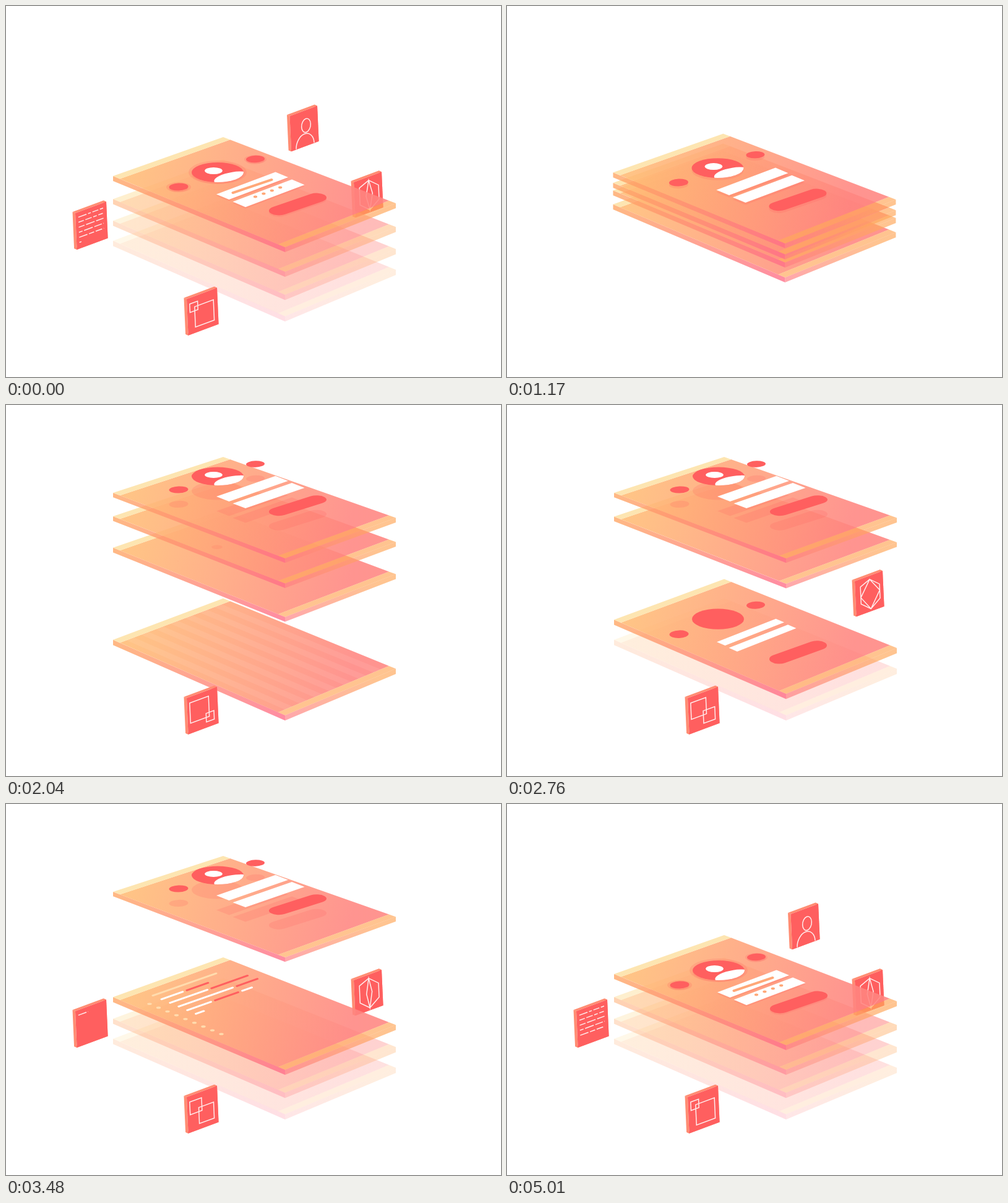
Write an HTML page with a canvas that moves like this. It is 800 px wide and 600 px high and loops after 5.04 s.

```html
<!DOCTYPE html>
<html lang="en">
<head>
<meta charset="utf-8">
<title>Layers</title>
<style>
  html, body { margin: 0; width: 100%; height: 100%; overflow: hidden; background: #fff; }
  canvas { display: block; width: 800px; height: 600px; }
</style>
</head>
<body>
<canvas id="stage" width="800" height="600"></canvas>
<script>
const ctx = document.getElementById('stage').getContext('2d');
const LOOP = 5040, REST = 630, OPEN = 1050, CLOSE = 5070, SPAN = 450;
const DROP = [OPEN, 1910, 2720, 3763];   // when each slab goes down, lowest first
const RED = '#ff5f5f', WHITE = '#fff', PALE = '#ffdcae', PEACH = '#ffa878';

const mix = (a, b, p) => a + (b - a) * p;
const part = (t, start, span) => Math.max(0, Math.min(1, (t - start) / span));

// Eased progress from 0 to 1.
function move(t, start, span = SPAN) {
  const q = part(t, start, span);
  return q < .5 ? 4 * q ** 3 : 1 - 4 * (1 - q) ** 3;
}

// Draws with a fading factor and restores the state.
function group(alpha, draw) {
  if (alpha <= 0) return;
  ctx.save();
  ctx.globalAlpha *= alpha;
  draw();
  ctx.restore();
}

function poly(points, fill, alpha = 1) {
  group(alpha, () => {
    ctx.fillStyle = fill;
    ctx.beginPath();
    points.forEach(p => ctx.lineTo(...p));
    ctx.fill();
  });
}

const para = (x, y, ax, ay, dx, dy) =>
  [[x, y], [x + ax, y + ay], [x + ax + dx, y + ay + dy], [x + dx, y + dy]];

function oval(x, y, rx, ry, fill, tilt = 0) {
  ctx.fillStyle = fill;
  ctx.beginPath();
  ctx.ellipse(x, y, rx, ry, tilt, 0, 7);
  ctx.fill();
}

// Round-ended bar foreshortened in y.
function capsule(x1, y1, x2, y2, rx, ry, color) {
  const k = ry / rx;
  ctx.save();
  ctx.scale(1, k);
  ctx.lineCap = 'round';
  ctx.lineWidth = 2 * rx;
  ctx.strokeStyle = color;
  ctx.beginPath();
  ctx.moveTo(x1, y1 / k);
  ctx.lineTo(x2, y2 / k);
  ctx.stroke();
  ctx.restore();
}

function grown(x, y, g, draw) {
  if (g <= 0) return;
  ctx.save();
  ctx.translate(x, y);
  ctx.scale(g, g);
  ctx.translate(-x, -y);
  draw();
  ctx.restore();
}

function ramp(x1, y1, x2, y2, c1, c2) {
  const g = ctx.createLinearGradient(x1, y1, x2, y2);
  g.addColorStop(0, c1);
  g.addColorStop(1, c2);
  return g;
}
const FACE = ramp(205, 265, 545, 365, '#ffbb75', '#ff8580');
const FRONT = ramp(173, 279, 451, 394, '#ffa562', '#ff6c88');
const SIDE = ramp(451, 394, 600, 335, '#ff7d84', '#ffa85c');

// Slab plane at height 275: u along the front edge, v along the left edge.
const P = (u, v) => [173 + 278 * u + 178 * v + u * v, 275 + 115 * u - 63 * v - 8 * u * v];
const strip = (u1, u2, v1 = 0, v2 = 1) => [P(u1, v1), P(u1, v2), P(u2, v2), P(u2, v1)];
const wall = (p, q) => [p, q, [q[0], q[1] + 8], [p[0], p[1] + 8]];

// Moves art from height `base` to `level`; lower planes look more open.
function atLevel(level, base, dx, draw) {
  const d = level - base, k = .000592;
  ctx.save();
  ctx.transform(1, 0, 0, 1 + k * d, dx, d * (1 - k * base));
  draw();
  ctx.restore();
}

function slab() {
  poly(wall(P(0, 0), P(1, 0)), FRONT, .78);
  poly(wall(P(1, 0), P(1, 1)), SIDE, .68);
  poly(strip(.04, .96), FACE, .88);
  poly(strip(0, .04), '#fde3ab', .92);
  poly(strip(.96, 1), '#ffa85c', .68);
}

function stripes(t) {
  const end = mix(.04, .96, move(t, 1540));
  for (let v = .06; v < .9; v += .133) poly(strip(.04, end, v, v + .067), WHITE, .08);
}

// The card's basic shapes; `g` gives the size of each step, `w` the bar width.
function shapes(body, bar, w, g = () => 1) {
  grown(342, 268.5, g(0), () => oval(342, 268.5, 42, 16, body));
  grown(279, 292, g(1), () => oval(279, 292, 15.5, 6, body, -.04));
  grown(403, 247, g(1), () => oval(403, 247, 15, 5.7, body, -.04));
  for (const k of [0, 1]) {
    const x = 340 + k * (w + 6), y = 304 + k * (.42 * w + 3.5);
    grown(x + 50, y - 15, g(2 + k), () => poly(para(x, y, 95.5, -36, w, .42 * w), bar));
  }
  grown(471, 320, g(4), () => capsule(441, 330.5, 502, 309.5, 16, 7.4, body));
}

function wireframe(t) {
  ctx.translate(-1, 5.5);
  shapes(RED, WHITE, 13.5, i => move(t, DROP[1] + 60 * i, 350));
}

// Word lengths in each typed line.
const WORDS = [[102], [34, 34], [60, 58], [87, 33], [38, 37, 15], [40, 37]];

function code(t) {
  WORDS.forEach((words, r) => {
    const typed = (t - 3047 - 85 * r) * 1.4;
    let from = 0;
    words.forEach((length, i) => {
      const end = Math.min(from + length, typed);
      const x = 237.5 + 13.9 * r, y = 310.5 + 5.9 * r;
      const color = r ? [WHITE, RED][i % 2] : PALE;
      if (end > from) capsule(x + from, y - from * .352, x + end, y - end * .352, 2, 1.4, color);
      from += length + 7;
    });
  });
  for (let i = 0; i < 15 && t >= 3040 + 55 * i; i++)
    oval(232 + 14.5 * i, 324 + 6.1 * i, 3.7, 1.8, PALE);
}

function profile(t) {
  const hop = 9 * Math.sin(Math.PI * part(t, 3750, 180));
  const lift = 1 + 24.5 * (move(t, OPEN, 400) - move(t, 3800, 270)) + hop;
  const halo = move(t, 4150) - move(t, CLOSE);
  ctx.translate(0, 3);
  group(.2, () => shapes(RED, RED, 20.5));
  group(.2 * halo, () => {
    oval(342, 266, 47, 19, RED);
    oval(279, 290, 20, 8, RED);
    oval(403, 245, 18, 7, RED);
  });
  ctx.translate(0, -lift - 1.5 * halo);
  shapes(RED, WHITE, 20.5);
  oval(335.5, 266, 14.3, 5.5, WHITE);
  group(1, () => {
    ctx.beginPath();
    ctx.ellipse(342, 268.5, 42, 16, 0, 0, 7);
    ctx.clip();
    oval(367, 278, 31, 10, WHITE, -.16);
  });
  group(1 - move(t, CLOSE, 180), () => form(t));
}

function form(t) {
  const p = move(t, 4300, 300);
  if (p) capsule(367, 301.5, 367 + 62 * p, 301.5 - 21 * p, 2.5, 1.9, PEACH);
  for (let i = 0; i < 4; i++) {
    const g = move(t, 4560 + 60 * i, 80);
    oval(403 + 13.4 * i, 308 - 5 * i, 3.1 * g, 1.9 * g, PEACH);
  }
}

// Tile: a unit-square face that stands up from a flat pose.
function tile(t, start, x, y, w, icon) {
  const size = move(t, start, 120) - move(t, 5300, 280);
  if (size <= 0) return;
  const up = move(t, start + 120, 360) - move(t, CLOSE, 380);
  const ax = w, ay = -.37 * w, dx = 2.6, dy = 42 + .34 * w;
  const a = [mix(31, ax, up) * size, mix(-12, ay, up) * size];
  const d = [mix(29, dx, up) * size, mix(13, dy, up) * size];
  const side = [-4.5 * up * size, mix(3, -2, up) * size];
  const ox = x + (ax + dx - a[0] - d[0]) / 2;
  const oy = y + (ay + dy - a[1] - d[1]) / 2 - 23 * (1 - up);
  const corners = para(ox, oy, ...a, ...d);
  corners.forEach((p, i) => {
    const q = corners[(i + 1) % 4];
    poly(para(...p, q[0] - p[0], q[1] - p[1], ...side), '#ff8d73');
  });
  poly(corners, RED);
  ctx.save();
  ctx.transform(...a, ...d, ox, oy);
  ctx.beginPath();
  icon(t);
  ctx.restore();
  ctx.strokeStyle = 'rgba(255,255,255,.88)';
  ctx.lineWidth = 1.5;
  ctx.stroke();
}

// Two squares trading size.
function squares(t) {
  const a = .26 + .36 * move(t, 1600, 420) - .23 * move(t, 2100, 1300)
    + .21 * move(t, 3500, 600) - .34 * move(t, 4100, 850);
  const b = .88 - a;
  ctx.rect(.09, .165, a, a * .9);
  ctx.rect(.866 - b, .845 - b * .9, b, b * .9);
}

function loopPath(points) {
  points.forEach((p, i) => i ? ctx.lineTo(...p) : ctx.moveTo(...p));
  ctx.closePath();
}

function gem(t) {
  const w = .22 + .12 * Math.cos(Math.PI * (t - 2760) / 720);
  const top = [.53, .1], low = [.53, .93];
  loopPath([top, [.87, .33], [.87, .73], low, [.19, .7], [.19, .22]]);
  loopPath([top, [.53 + w, .5], low, [.53 - w, .52]]);
}

const random = n => {
  const s = Math.sin(n * 12.9898) * 43758.5453;
  return s - Math.floor(s);
};

function text(t) {
  for (let r = 0, n = 1; r < 6; r++) {
    const typed = Math.min(r < 5 ? 40 : 6, (t - 3347) * .12 - 40 * r);
    for (let from = 0; from < typed; n++) {
      const end = from + 4 + 10 * random(n), y = .14 + r * .138;
      ctx.moveTo(.09 + from / 50, y);
      ctx.lineTo(.09 + Math.min(end, typed) / 50, y);
      from = end + 2.5;
    }
  }
}

function person() {
  ctx.ellipse(.57, .43, .165, .19, 0, 0, 2 * Math.PI);
  ctx.moveTo(.18, .99);
  ctx.ellipse(.505, .99, .325, .34, 0, Math.PI, 2 * Math.PI);
}

// Stack opens upward, then each slab drops to its place, then all close.
function levelOf(i, t) {
  const n = 3 - i;
  const rest = 280 + 9.5 * n;
  const high = i ? mix(rest, 142 + 38 * n, move(t, OPEN + 30 * n)) : rest;
  const low = 275 + 38.5 * n - 1.2 * n * n;
  const open = mix(high, low, move(t, DROP[i], i ? SPAN : 345));
  return mix(open, rest, move(t, CLOSE, 530));
}

const ART = [[stripes, 275], [wireframe, 275], [code, 313], [profile, 275]];

function draw(t) {
  ctx.clearRect(0, 0, 800, 600);
  const closing = move(t, CLOSE, 530);
  const dx = -1.6 * (1 - move(t, 1100) + closing);
  ART.forEach(([art, base], i) => {
    const level = levelOf(i, t);
    const gone = i < 3 ? move(t, DROP[i + 1] + 200) : 0;
    const alpha = mix(1, .28 * 1.5 ** i, gone * (1 - closing));
    if (i === 2) tile(t, DROP[1] + 200, 562, 285, 45, gem);
    group(i < 3 ? alpha : 1, () => atLevel(level, 275, dx, slab));
    group(1 - gone, () => atLevel(level, base, dx, () => art(t)));
  });
  tile(t, DROP[0] + 200, 292, 474, 49, squares);
  tile(t, DROP[2] + 200, 112, 335, 50, text);
  tile(t, DROP[3] + 180, 458.5, 178, 44.5, person);
}

const begin = performance.now();
function tick() {
  const t = (performance.now() - begin) % LOOP;
  draw(t < REST ? t + LOOP : t);
  requestAnimationFrame(tick);
}
tick();
</script>
</body>
</html>
```
